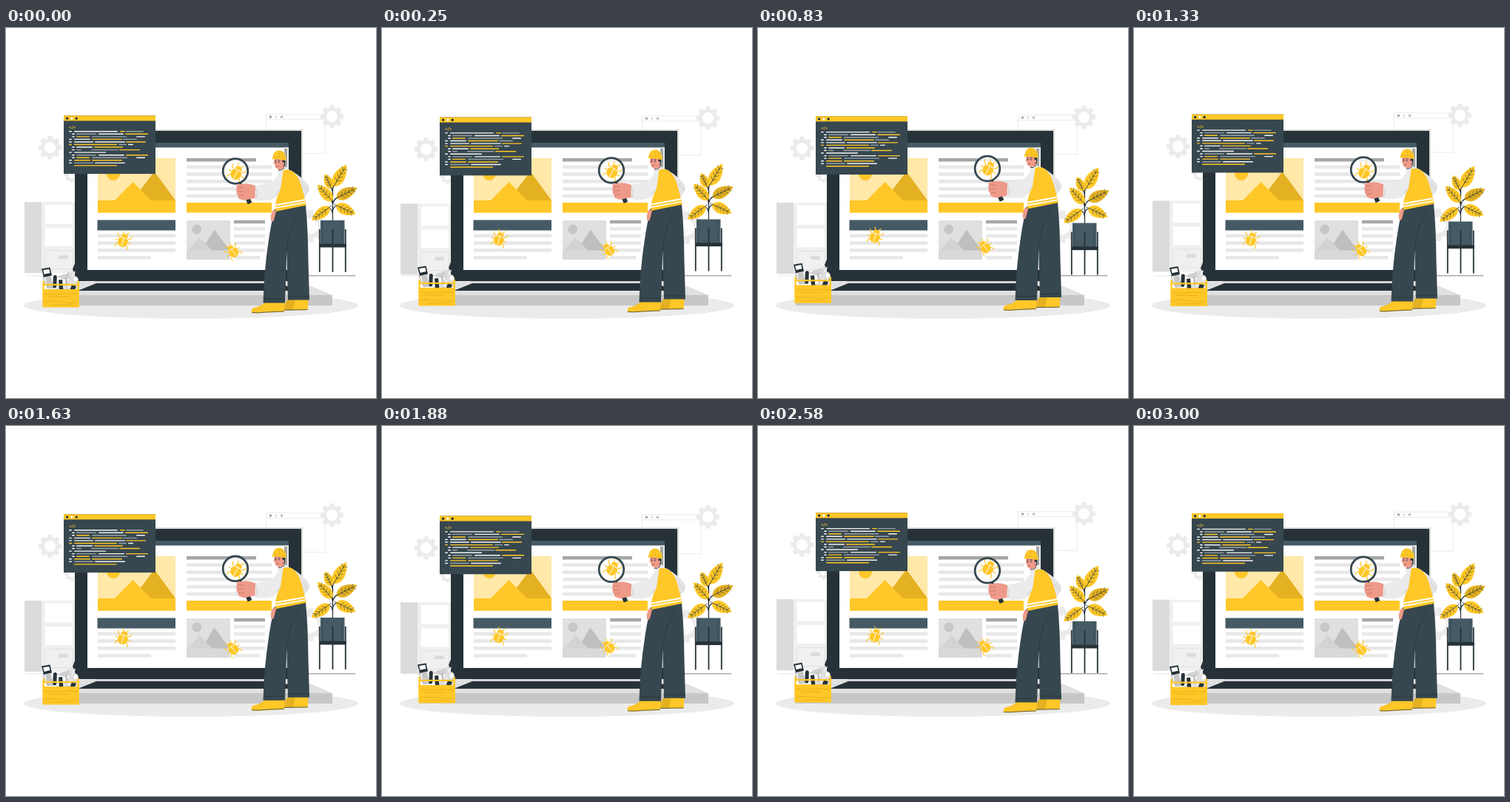
Animation of 500x500 px, one loop 3040 ms. Source, as an HTML page with a canvas:

```html
<!DOCTYPE html>
<html lang="en">
<head>
<meta charset="utf-8">
<title>Debugging</title>
<style>
html, body { margin: 0; width: 100%; height: 100%; overflow: hidden; background: #fff; }
canvas { display: block; width: 500px; height: 500px; }
</style>
</head>
<body>
<canvas id="stage"></canvas>
<script>
const canvas = document.getElementById('stage');
const ratio = window.devicePixelRatio || 1;
canvas.width = canvas.height = 500 * ratio;
const c = canvas.getContext('2d');

const LOOP = 3040, HALF = LOOP / 2;
const YELLOW = '#ffc727', AMBER = '#e4b122', INK = '#263238', SLATE = '#37474f', STEEL = '#455a64';
const PALE = '#ebebeb', SKIN = '#ee9a88', WHITE = '#fff';

function rect(x1, y1, x2, y2, fill) {
  c.fillStyle = fill;
  c.fillRect(x1, y1, x2 - x1, y2 - y1);
}
function poly(fill, ...p) {
  c.beginPath();
  for (let i = 0; i < p.length; i += 2) c.lineTo(p[i], p[i + 1]);
  c.closePath();
  c.fillStyle = fill;
  c.fill();
}
function shape(fill, d) {
  c.fillStyle = fill;
  c.fill(new Path2D(d));
}
function line(color, width, d) {
  c.strokeStyle = color;
  c.lineWidth = width;
  c.stroke(new Path2D(d));
}
function oval(x, y, rx, ry, fill, turn = 0) {
  c.beginPath();
  c.ellipse(x, y, rx, ry, turn, 0, Math.PI * 2);
  c.fillStyle = fill;
  c.fill();
}
function shifted(dy, draw) {
  c.save();
  c.translate(0, dy);
  draw();
  c.restore();
}
// Linear up-and-down wave: 1 at the peak time, 0 half a period later.
function wave(t, peak, period) {
  const u = ((t - peak + 2 * period) % period) / period;
  return Math.abs(1 - 2 * u);
}

function gear(x, y, r) {
  c.save();
  c.translate(x, y);
  c.beginPath();
  for (let i = 0; i < 8; i++) {
    const a = i * Math.PI / 4;
    [[-.27, .77], [-.19, 1], [.19, 1], [.27, .77]].forEach(([da, k]) =>
      c.lineTo(Math.cos(a + da) * r * k, Math.sin(a + da) * r * k));
  }
  c.closePath();
  c.moveTo(r * .48, 0);
  c.arc(0, 0, r * .48, 0, Math.PI * 2, true);
  c.fillStyle = PALE;
  c.fill();
  c.restore();
}

function backdrop() {
  gear(59.5, 161.5, 16);
  gear(440.5, 119.5, 16);
  gear(89, 198.5, 10);
  gear(411, 267.5, 22.5);

  c.strokeStyle = PALE;
  c.lineWidth = 1;
  c.strokeRect(351.5, 116.5, 79.5, 53);
  line(PALE, 1, 'M351 123.5H431');
  oval(357.5, 120, 1.8, 1.8, '#a6a6a6');
  oval(365, 120, 1.6, 1.6, '#dbdbdb');
  oval(372.5, 120, 1.8, 1.8, '#bdbdbd');

  rect(25, 235, 48, 331, '#dbdbdb');
  rect(48, 235, 93, 331, '#f0f0f0');
  rect(53, 238.5, 90, 264.5, WHITE);
  rect(53, 270, 90, 295, WHITE);
  c.strokeStyle = '#e0e0e0';
  c.strokeRect(52.5, 300.5, 38, 25);
  c.beginPath();
  c.roundRect(71, 307, 13, 5, 2);
  c.fillStyle = '#dbdbdb';
  c.fill();
}

function rows(x1, x2, ys) {
  ys.forEach(y => rect(x1, y, x2, y + 4.6, '#e8e8e8'));
}

function laptop() {
  poly('#e0e0e0', 84, 342, 408, 347, 441, 361, 51, 361);
  rect(51, 361, 441, 375, '#c7c7c7');
  rect(97, 137, 401, 340, '#dbdbdb');
  rect(93, 139, 399, 342, INK);
  rect(120, 342, 372, 345, '#d4d4d4');
  poly(INK, 122, 345, 370, 345, 395, 355, 97, 355);

  rect(110, 155, 382, 327, WHITE);
  rect(110, 155, 382, 161.5, STEEL);
  rect(376.5, 161.5, 382, 327, PALE);
  rect(376, 163, 380, 188, '#a6a6a6');

  rect(124, 176, 229, 250, '#ffe8a8');
  oval(145, 197, 9, 9, YELLOW);
  poly(AMBER, 170, 234, 200.5, 194, 229, 233, 229, 234);
  poly(YELLOW, 146, 234, 171.5, 208, 197, 234);
  rect(124, 233, 229, 249.5, YELLOW);

  rect(244, 176, 338, 180.5, '#a6a6a6');
  rows(244, 359, [185.5, 195.3, 205, 215, 224.8]);
  rect(244, 236, 359, 249.5, YELLOW);

  rect(123.5, 259.5, 229, 273.5, STEEL);
  rows(124, 229, [278.5, 288.3, 298]);
  rows(124, 196, [308]);

  rect(244, 260, 303, 313, '#e0e0e0');
  oval(257.8, 272, 6.5, 6.5, '#c7c7c7');
  poly('#bfbfbf', 264, 301, 281.5, 272.5, 303, 301);
  poly('#d3d3d3', 245, 301, 261.5, 283, 279, 301);
  rect(244, 300.5, 303, 313, '#d9d9d9');

  rect(308, 259.8, 350, 264.2, '#a6a6a6');
  rows(308, 350, [269, 278.7, 288.4, 298]);
  rows(308, 343, [308]);
}

// Each row: colour letter, start and end of every dash.
const CODE = [
  'w85-89 w92-151 y154-161 g162-186',
  'w89-93 g95-122 w125-159 y161-192',
  'w89-93 y95-113 g116-163 w176-188',
  'w85-89 w92-114 y116-157 g158-177',
  'w85-89 w92-118 w120-161 y162-189',
  'y85-89 y92-150 g152-163 w165-172',
  'w89-93 w95-117 y119-158',
  'w89-93 g95-102 g115-152 y153-181',
  'w85-89 w92-135',
  'w89-93 g95-122 w125-160 y162-192',
  'w89-93 y95-113 g116-164 w176-188',
  'w85-89 y92-114 y116-157',
  'w85-89 g92-118 w120-161',
  'y92-150'
].map(r => r.split(' ').map(s => [s[0], ...s.slice(1).split('-').map(Number)]));
const TINT = { w: '#f5f5f5', y: YELLOW, g: '#98a2a7' };

function codePanel() {
  rect(78, 118.2, 202, 197, SLATE);
  rect(78, 118.2, 202, 125.3, YELLOW);
  [INK, WHITE, INK].forEach((f, i) => oval(82.6 + i * 6.3, 122, 1.7, 1.7, f));
  c.fillStyle = YELLOW;
  c.font = '600 5.5px Inter, sans-serif';
  c.fillText('</>', 85, 136.2);
  c.lineCap = 'round';
  CODE.forEach((row, i) => row.forEach(([k, a, b]) => {
    line(TINT[k], 1.4, `M${a + .7} ${139.6 + i * 3.55}H${b - .7}`);
  }));
  c.lineCap = 'butt';
}

function toolbox() {
  // tester with its cable
  poly(INK, 48, 325.5, 59.5, 323.5, 62, 334.5, 51, 337);
  poly(WHITE, 50.2, 327.2, 58.2, 325.8, 59.6, 331, 51.6, 332.8);
  poly('#c7c7c7', 53, 337, 61, 335.5, 64, 352, 56, 352);
  line('#8a8a8a', .8, 'M50 336Q52 346 57 352');
  // screwdriver, chisel, hammer
  c.lineCap = 'round';
  line(INK, 5, 'M66.3 336.5L65.8 349');
  c.lineCap = 'butt';
  poly(INK, 71, 340.5, 76, 340, 77.5, 355, 72, 355);
  shape('#d0d0d0', 'M69 337Q75 333 82 332L86 329L87 337Q82 341 76 339Z');
  line('#bdbdbd', 2.5, 'M81 337L83 354');
  // saw and wrench
  poly(PALE, 89, 327, 94, 329, 86, 352, 81, 352);
  line('#bdbdbd', .8, 'M90 328L82.5 351');
  poly(INK, 93.5, 317, 95, 326, 92, 330, 90, 326);
  oval(92.5, 341, 5.5, 6, '#dedede');
  oval(94, 340, 2.5, 3, WHITE);
  poly(INK, 89, 347, 95, 349, 92, 356, 86, 355);
  // box
  rect(49.5, 342, 51.8, 354, YELLOW);
  rect(96.5, 342, 99, 354, YELLOW);
  rect(49.5, 345.8, 99, 348, YELLOW);
  rect(49.3, 353, 99, 377.5, YELLOW);
  line('#d9a616', .6, 'M52 359Q62 361 72 359.5T97 360M57 363H86M52 370Q66 368 78 370.5T96 370M60 374H90');
}

function leaf(x1, y1, x2, y2, w, fill) {
  c.save();
  c.translate(x1, y1);
  c.rotate(Math.atan2(y2 - y1, x2 - x1));
  const n = Math.hypot(x2 - x1, y2 - y1);
  shape(fill, `M0 0C${n * .15} ${-w} ${n * .6} ${-w} ${n} 0C${n * .6} ${w} ${n * .15} ${w} 0 0Z`);
  line(INK, .7, `M-3 0H${n * .87}`);
  for (let k = .22; k < .75; k += .17)
    line(INK, .45, `M${n * (k + .13)} ${-w * .42}L${n * k} 0L${n * (k + .13)} ${w * .42}`);
  c.restore();
}

function plant() {
  line(INK, 1.2, 'M441.5 262V218Q441 214 444 211M441.5 222Q441 217 438 213M441.5 240Q441 233 438 230M441.5 238Q443 231 450 228M441.5 249Q442 239 450 241M441.5 253Q441 242 434 244');
  leaf(443, 214, 460, 185, 10.5, YELLOW);
  leaf(440, 217.5, 431, 197.5, 8, YELLOW);
  leaf(441, 234, 421, 212, 9.5, YELLOW);
  leaf(446.5, 230, 474.5, 216, 10, AMBER);
  leaf(446, 239.5, 472.5, 252, 10, YELLOW);
  leaf(437.5, 242, 413, 260, 9.5, YELLOW);
  rect(425, 260, 457.5, 293, STEEL);
  line(SLATE, .8, 'M428 261V291M454 261V291');
  rect(423, 291.8, 459.8, 296.6, INK);
  [423.8, 441.5, 458.8].forEach(x => rect(x - .9, 272, x + .9, 330, INK));
}

function bug(x, y, turn, size) {
  c.save();
  c.translate(x, y);
  c.rotate(turn);
  c.scale(size, size);
  line(YELLOW, 1.2, 'M-2 -8Q-2 -11 -5 -13M2 -8Q2 -11 5 -13M-6 -4L-9 -5L-10 -9M6 -4L9 -5L10 -9M-7 1H-11.5M7 1H11.5M-6 5L-8.5 7L-9 11M6 5L8.5 7L9 11');
  oval(0, -6, 4.6, 3.8, YELLOW);
  oval(0, 1, 7.2, 8.3, YELLOW);
  line(WHITE, .9, 'M-6 -3.6Q0 -5.4 6 -3.6M0 -4.4V9');
  c.restore();
}

function legs() {
  shape(AMBER, 'M381 366H408.5L407.5 381L376 381.5L374 378Z');
  shape(YELLOW, 'M391 366H408.5L407.5 381H388Z');
  line(INK, .7, 'M375 381.2L407.5 380.6');
  shape(YELLOW, 'M349 370H377L376 383.5L352 384.6Q340 386 332 385Q330.5 380.5 334 378.5Q344 376 348.5 372Z');
  line(INK, .7, 'M332 384.6Q340 385.4 352 384L376 383');
  line(AMBER, .6, 'M341 377L345 379M344.5 375L348.5 377');

  shape(SLATE, 'M363 245L405 239Q408 270 408.5 315L410 367.5H381Q380 335 379.3 300Q378.5 335 377 371.5H347.5Q349 325 354.5 290Q358 265 363 245Z');
  line(INK, .7, 'M379.2 303Q380 282 387 266M380.5 363H409.5M348 366H376.8M397 250Q390 258 388 262');
}

function torso() {
  // rear arm and hand
  shape(SKIN, 'M361 246Q357 252 358 260Q361 264 362.5 258L365 248Z');
  shape('#e4e4e4', 'M386 193Q401 202 409 213Q412 218 408.5 222L403 230L391 214Z');
  line('#b8b8b8', .6, 'M408.5 221L401 212');

  // neck and vest
  shape(SKIN, 'M367 185L376 184L377 195L369 195Z');
  shape(PALE, 'M367 193L376 189L386 193L382 202L370 204Z');
  shape(YELLOW, 'M374 193Q380 190 387 193.5Q396 201 399 213Q403 227 406 239.5L364 248Q363 238 367 227Q372 214 374 193Z');
  poly(WHITE, 364.5, 238.2, 403.8, 231.3, 404.3, 233.3, 364.2, 240.4);
  poly(WHITE, 364, 242.2, 405, 235, 405.4, 236.4, 364, 244);
  line(INK, .8, 'M368 192Q372 193.5 376 189');

  // head
  shape(SKIN, 'M363 176L376 177Q378 186 373 190Q368 192 364.5 189L363 184L361.5 183.5Z');
  shape(INK, 'M373.5 178H377Q378 184 375.5 188Q374.5 184 373.5 182Z');
  oval(374.4, 183.5, 1.8, 2.2, SKIN);
  oval(364.6, 181.3, .7, 1, INK);
  oval(368.8, 181.3, .7, 1, INK);
  line(INK, .8, 'M363 179.2L365.3 178.8M367.5 178.6L370.4 179.3');
  line('#a9483f', .7, 'M364.4 187Q366 187.6 368 186.6');
  shape(YELLOW, 'M360.5 175Q361 165.5 369.5 165.2Q378.5 166.5 378.8 179L375 178.8Q367 176 359 177.6Z');
  line(AMBER, .8, 'M360.5 174.3Q369 173 378 177.5M367.5 165.8Q370 169 369.5 173.8M371 165.8Q374.5 169 374 174.5');
}

function lensGlass() {
  oval(310, 193.5, 16.5, 16.5, 'rgba(255,255,255,.82)');
}

function lensAndArm() {
  c.beginPath();
  c.arc(310, 193.5, 16.8, 0, Math.PI * 2);
  c.strokeStyle = SLATE;
  c.lineWidth = 2.8;
  c.stroke();
  line(INK, 3, 'M316.5 210L320 217');
  line(INK, 6, 'M324 224L329.5 237');

  shape(PALE, 'M374.5 193Q368 196 363 205Q355 210 337 213L336 232Q352 235 361 231Q368 227 371 218Z');
  line('#b8b8b8', .6, 'M337.5 216Q341 222 338.5 230M371 218Q367 221 364.5 226');
  shape(SKIN, 'M337 213Q328 209.5 321 210.5L313 211.5Q310 213.5 312.5 216Q309.5 218 312 221.5Q310.5 225 314 226.5Q313 231 317.5 231.5Q322 234 328 231.5L336.5 230Z');
  line('#c66a5c', .7, 'M312.5 216L321 215.5M312.5 221.5L321 220.5M314.5 226.7L322 225.5');
}

function draw(t) {
  c.setTransform(ratio, 0, 0, ratio, 0, 0);
  rect(0, 0, 500, 500, WHITE);

  const panelY = -2.4 + 6.6 * wave(t, 470, HALF);
  const boxY = -6.3 + 6.3 * wave(t, 0, HALF);
  const plantY = -1.9 + 6.6 * wave(t, 965, HALF);
  const manY = -3.8 + 6.4 * wave(t, 2420, LOOP);

  oval(250, 375, 226, 17.8, PALE);
  shifted(panelY, backdrop);
  line('#d6d6d6', .6, 'M27 334.8H95');
  line(INK, .6, 'M399 334.8H472');
  laptop();
  shifted(panelY, codePanel);
  shifted(boxY, toolbox);
  shifted(plantY, plant);
  shifted(manY, lensGlass);
  shifted(boxY, () => {
    bug(158.3, 287.5, .3, .95);
    bug(306.8, 302, -.65, .9);
    bug(311.5, 196, .5, 1);
  });
  shifted(manY, () => {
    legs();
    torso();
    lensAndArm();
  });
}

function frame() {
  draw(performance.now() % LOOP);
  requestAnimationFrame(frame);
}
frame();
</script>
</body>
</html>
```
